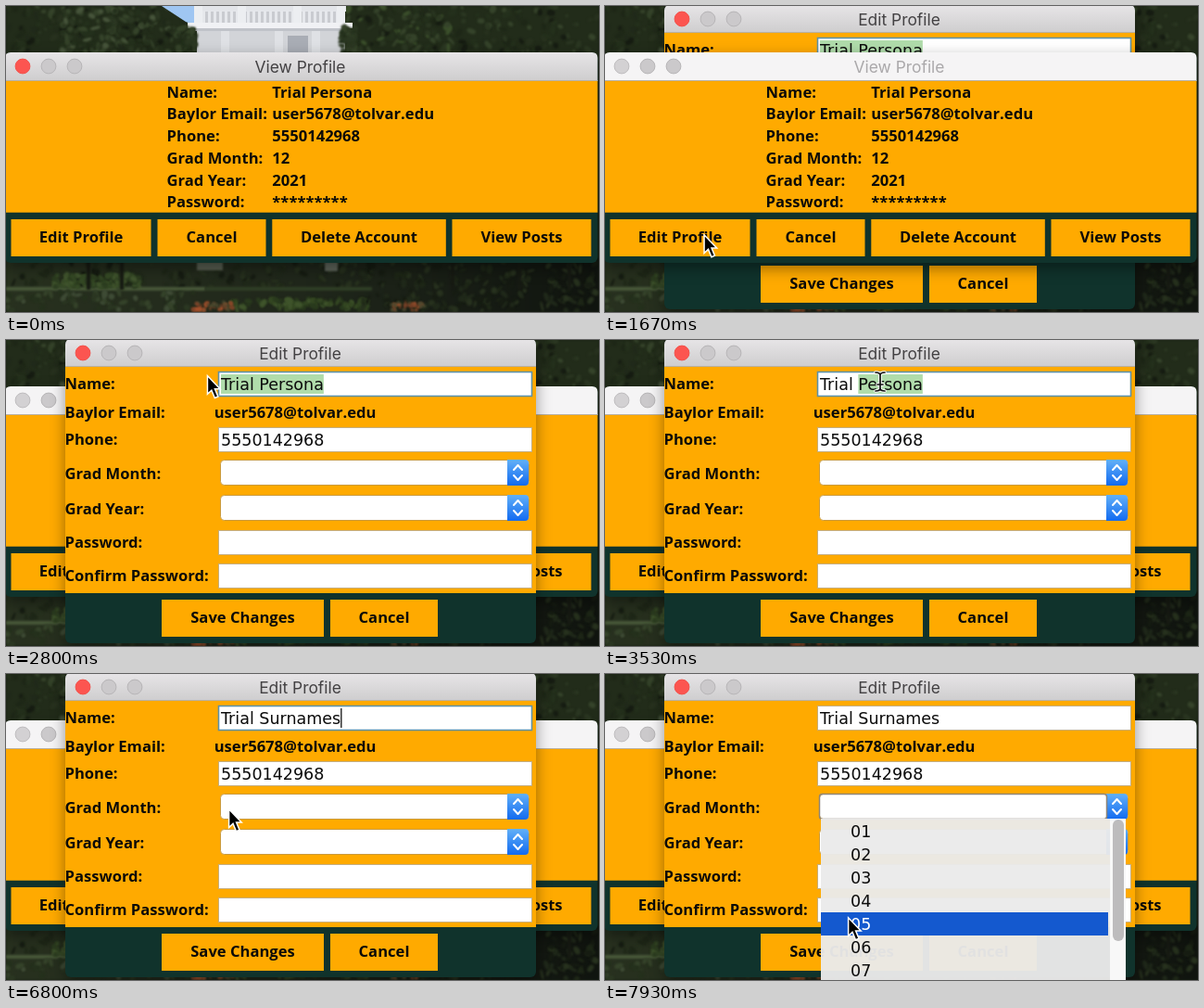
Recreate the animation shown at these times as an HTML page with a canvas. Size 640 px wide and 330 px high, loop 8000 ms.

```html
<!DOCTYPE html>
<html lang="en">
<head>
<meta charset="utf-8">
<title>Edit Profile</title>
<style>
  html, body { margin: 0; width: 100%; height: 100%; overflow: hidden; background: #172012; }
  canvas, svg { position: absolute; left: 0; top: 0; width: 640px; height: 330px; }
  text { white-space: pre; }
  .label { font: bold 16.6px "Open Sans", sans-serif; fill: #0b0b08; }
  .title { font: 17.4px Inter, sans-serif; fill: #434143; }
  .input { font: 17.5px "DejaVu Sans", sans-serif; fill: #0c0c0c; }
  .mid { text-anchor: middle; }
  .window { filter: drop-shadow(0 6px 8px rgba(0, 0, 0, .4)); }
</style>
</head>
<body>
<canvas id="photo" width="640" height="330"></canvas>
<svg id="stage" viewBox="0 0 640 330">
  <defs>
    <linearGradient id="bar" x2="0" y2="1"><stop stop-color="#e7e5e7"/><stop offset="1" stop-color="#cecdce"/></linearGradient>
    <linearGradient id="blue" x2="0" y2="1"><stop stop-color="#62b0f8"/><stop offset="1" stop-color="#126af0"/></linearGradient>
  </defs>
</svg>
<script>
const LOOP = 8000, STEP = LOOP / 120;
const ORANGE = '#ffaa00', GREEN = '#10332c';
const OPEN_EDIT = 1530, RAISE_EDIT = 2650, SELECT_WORD = 3260;
const TYPE_START = 3900, TYPE_GAP = 150, OPEN_LIST = 6910;
const FIRST = 'Trial ', OLD_LAST = 'Persona', NEW_LAST = 'Surnames';
const EMAIL = 'user5678@tolvar.edu', PHONE = '5550142968';
// time, x, y of the pointer
const PATH = [
  [200, 20, 345], [900, 104, 251], [1600, 104, 251], [2330, 208, 37], [2720, 208, 37],
  [3130, 297, 45], [5700, 297, 45], [6600, 240, 145], [7000, 240, 145], [7800, 262, 262]
];

const stage = document.getElementById('stage');

function add(parent, tag, attrs = {}, content) {
  const node = document.createElementNS('http://www.w3.org/2000/svg', tag);
  for (const key in attrs) node.setAttribute(key, attrs[key]);
  if (content !== undefined) node.textContent = content;
  return parent.appendChild(node);
}
const rect = (parent, x, y, width, height, fill, more = {}) =>
  add(parent, 'rect', { x, y, width, height, fill, ...more });
const text = (parent, x, y, content, cls = 'label') =>
  add(parent, 'text', { x, y, class: cls }, content);
const show = (node, on) => node.setAttribute('visibility', on ? 'visible' : 'hidden');

function paintPhoto() {
  const c = document.getElementById('photo').getContext('2d');
  let seed = 7;
  const rnd = () => (seed = (seed * 16807) % 2147483647) / 2147483647;
  const box = (color, x, y, w, h) => { c.fillStyle = color; c.fillRect(x, y, w, h); };
  const leaves = (n, x, y, w, h, colors, size) => {
    for (let i = 0; i < n; i++) {
      c.fillStyle = colors[Math.floor(rnd() * colors.length)];
      c.beginPath();
      c.ellipse(x + rnd() * w, y + rnd() * h, size * (.4 + rnd()), size * (.3 + rnd() * .6), rnd() * 3, 0, 7);
      c.fill();
    }
  };
  const dark = ['#161c12', '#1e2717', '#27311e', '#20291a'];
  const mid = ['#2b3722', '#35432a', '#24301c'];
  const flowers = ['#a5512c', '#7d4328', '#4c4a30'];

  c.filter = 'blur(1.2px)';
  box('#222c1a', 0, 0, 640, 60);
  leaves(420, 0, 0, 640, 55, [...dark, ...mid], 4);
  leaves(110, 60, 0, 120, 52, [...mid, '#46543a'], 4);
  leaves(60, 368, 0, 110, 50, [...mid, '#3b4f2b'], 4);

  c.filter = 'blur(.5px)';
  c.fillStyle = '#9fc6f2';
  c.beginPath();
  c.moveTo(168, 0); c.lineTo(212, 0); c.lineTo(212, 24); c.lineTo(194, 17);
  c.fill();
  box('#c9cbd0', 206, 0, 160, 55);
  box('#e3e5e9', 203, 0, 164, 6);
  for (let x = 206; x < 366; x += 6) box('#e6e8ec', x, 5, 3, 13);
  for (const x of [203, 250, 310, 357]) box('#eceef1', x, 0, 9, 20);
  box('#f0f1f4', 196, 18, 178, 6);
  box('#c0c3c9', 204, 24, 162, 3);
  box('#d2d4d8', 206, 27, 160, 25);
  box('#a9adb5', 304, 32, 22, 20);
  for (const x of [232, 290, 330]) box('#dfe1e5', x, 27, 9, 25);
  c.filter = 'blur(1.2px)';
  leaves(50, 184, 22, 20, 30, mid, 4);
  leaves(50, 362, 22, 14, 28, mid, 4);

  const ground = c.createLinearGradient(0, 0, 640, 0);
  ground.addColorStop(0, '#28311f');
  ground.addColorStop(.5, '#20271b');
  ground.addColorStop(1, '#10140f');
  c.fillStyle = ground;
  c.fillRect(0, 272, 640, 58);
  leaves(220, 0, 274, 640, 30, dark, 4);
  box('#596052', 206, 276, 28, 9);
  box('#5f665c', 344, 276, 14, 10);
  box('#465638', 0, 303, 215, 4);
  box('#2f3d25', 215, 303, 180, 4);
  leaves(110, 52, 290, 92, 13, ['#364a26', '#2c3d20', '#42562f'], 4);
  leaves(70, 0, 308, 205, 20, [...mid, '#3e4b35'], 4);
  leaves(90, 240, 317, 150, 9, ['#344722', '#3f542b', '#293a1d'], 4);
  leaves(90, 385, 305, 255, 24, dark, 4);
  for (const x of [87, 123, 480, 552, 606]) box('#171a13', x, 272, 4, 34);
  leaves(45, 203, 320, 42, 8, flowers, 2.5);
  leaves(35, 415, 320, 38, 8, flowers, 2.5);
  c.filter = 'none';
}

function windowFrame(x, y, w, h, barHeight, footTop, name, titleX) {
  const group = add(stage, 'g', { class: 'window' });
  rect(group, x, y, w, h, GREEN, { rx: 6 });
  const bar = add(group, 'path', {
    d: `M${x} ${y + barHeight}V${y + 6}q0-6 6-6H${x + w - 6}q6 0 6 6V${y + barHeight}z`, fill: 'url(#bar)'
  });
  rect(group, x, y + barHeight - 1, w, 1, '#b9b0a0');
  rect(group, x, y + barHeight, w, footTop - y - barHeight, ORANGE);
  const left = x < 0 ? 18 : x + 19, cy = y + 15;
  const lights = [0, 28, 56].map(dx => add(group, 'circle', {
    cx: left + dx, cy, r: 7.9, fill: dx ? '#cbc9cb' : '#fc5550', stroke: dx ? '#b7b5b7' : '#f3504a'
  }));
  const title = text(group, titleX, y + 21.7, name, 'title mid');
  return { group, bar, lights, title };
}

function button(parent, x, y, w, name) {
  rect(parent, x, y, w, 40, ORANGE);
  text(parent, x + w / 2, y + 24.6, name, 'label mid');
}

function inputBox(parent, y) {
  rect(parent, 229.5, y + .5, 338, 26, '#fff', { stroke: '#c5ae80' });
}

function combo(parent, y) {
  rect(parent, 231.5, y + .5, 333, 27, '#fff', { rx: 4, stroke: '#c99a3d' });
  add(parent, 'path', { d: `M541 ${y}h19q4 0 4 4v20q0 4-4 4h-19z`, fill: 'url(#blue)' });
  add(parent, 'path', {
    d: `M548 ${y + 11}l4.5-5 4.5 5M548 ${y + 17}l4.5 5 4.5-5`,
    fill: 'none', stroke: '#fff', 'stroke-width': 2, 'stroke-linecap': 'round', 'stroke-linejoin': 'round'
  });
}

paintPhoto();

const edit = windowFrame(64, -1, 508, 328, 30, 273, 'Edit Profile', 317.5);
const form = edit.group;
[['Name:', 53], ['Baylor Email:', 83.5], ['Phone:', 112.7], ['Grad Month:', 150], ['Grad Year:', 187.7],
  ['Password:', 224], ['Confirm Password:', 260]].forEach(([name, y]) => text(form, 63.5, y, name));
text(form, 224.7, 83.5, EMAIL);
[34, 94, 205, 241].forEach(y => inputBox(form, y));
[129, 167].forEach(y => combo(form, y));
const focusRing = rect(form, 229.5, 34.5, 338, 26, 'none', { stroke: '#5c91a8', 'stroke-width': 1.6 });
const selection = rect(form, 231, 37, 117, 21, '#b0dcab');
const nameText = text(form, 232, 54, FIRST + OLD_LAST, 'input');
const caret = rect(form, 0, 37, 1.3, 21, '#111');
text(form, 232, 114, PHONE, 'input');
button(form, 168, 280, 175, 'Save Changes');
button(form, 350, 280, 116, 'Cancel');

const view = windowFrame(-1, 50, 639.5, 227, 31, 222.7, 'View Profile', 317.5);
[['Name:', FIRST + OLD_LAST], ['Baylor Email:', EMAIL], ['Phone:', PHONE], ['Grad Month:', '12'],
  ['Grad Year:', '2021'], ['Password:', '*********']].forEach(([name, value], i) => {
  text(view.group, 173.6, 98.7 + i * 23.7, name);
  text(view.group, 287.3, 98.7 + i * 23.7, value);
});
[[5.5, 151, 'Edit Profile'], [163.5, 117, 'Cancel'], [287.3, 187.5, 'Delete Account'], [481.5, 150, 'View Posts']]
  .forEach(([x, w, name]) => button(view.group, x, 230, w, name));

const list = add(stage, 'g');
rect(list, 231.5, 129.5, 310, 27, 'none', { rx: 3, stroke: '#8e8577', 'stroke-width': 1.5 });
rect(list, 233, 156, 329, 180, '#ebebeb', { opacity: .96 });
rect(list, 545, 156, 17, 180, '#f8f8f8');
rect(list, 548, 157, 12, 131, '#bdbcbd', { rx: 6 });
const highlight = rect(list, 233, 0, 310, 25, '#1459cf');
const months = [1, 2, 3, 4, 5, 6, 7].map((n, i) => text(list, 265, 175.5 + i * 25, '0' + n, 'input'));

const pointer = add(stage, 'g');
const arrow = add(pointer, 'path', {
  d: 'M.6 .8V20.5L5 16.4 8.5 24.7 12 23.2 8.6 15H14.2Z', fill: '#000', stroke: '#fff', 'stroke-width': 1.5
});
const beam = add(pointer, 'g', { fill: 'none', 'stroke-linecap': 'round' });
for (const [stroke, width] of [['#fff', 3.6], ['#111', 1.7]])
  add(beam, 'path', { d: 'M-5-10q5 0 5 3 0-3 5-3M-5 10q5 0 5-3 0 3 5 3M0-7V7M-3 3H3', stroke, 'stroke-width': width });

function pointerAt(t) {
  const next = PATH.findIndex(p => p[0] > t);
  if (next < 1) return PATH[next ? PATH.length - 1 : 0].slice(1);
  const [t0, x0, y0] = PATH[next - 1], [t1, x1, y1] = PATH[next];
  const u = (t - t0) / (t1 - t0), k = u * u * (3 - 2 * u);
  return [x0 + (x1 - x0) * k, y0 + (y1 - y0) * k];
}

function render(t) {
  const [x, y] = pointerAt(t);
  const opened = t >= OPEN_EDIT, raised = t >= RAISE_EDIT, listed = t >= OPEN_LIST;

  edit.group.style.display = opened ? '' : 'none';
  const [back, front] = raised ? [view, edit] : [edit, view];
  if (back.group.nextSibling !== front.group) stage.insertBefore(back.group, front.group);
  view.bar.setAttribute('fill', opened ? '#f5f4f5' : 'url(#bar)');
  view.title.style.fill = opened ? '#aaa8aa' : '';
  view.lights[0].setAttribute('fill', opened ? '#d3d1d3' : '#fc5550');
  view.lights[0].setAttribute('stroke', opened ? '#bebcbe' : '#f3504a');

  const typed = t < TYPE_START ? 0 : Math.floor((t - TYPE_START) / TYPE_GAP) + 1;
  nameText.textContent = FIRST + (typed ? NEW_LAST.slice(0, typed) : OLD_LAST);
  selection.style.display = opened && !typed ? '' : 'none';
  if (opened) {
    const length = nameText.getComputedTextLength();
    const start = t >= SELECT_WORD ? nameText.getSubStringLength(0, FIRST.length) : 0;
    selection.setAttribute('x', 232 + start);
    selection.setAttribute('width', length - start);
    caret.setAttribute('x', 232 + length);
  }
  const typing = typed > 0 && typed <= NEW_LAST.length;
  const blink = typing || (t + 600) % 1000 < 500;
  caret.style.display = typed && !listed && blink ? '' : 'none';
  focusRing.style.display = listed ? 'none' : '';

  list.style.display = listed ? '' : 'none';
  const row = Math.floor((y - 157) / 25);
  highlight.style.display = row >= 0 ? '' : 'none';
  highlight.setAttribute('y', 157 + row * 25);
  months.forEach((m, i) => { m.style.fill = i === row ? '#fff' : ''; });

  pointer.style.display = t >= PATH[0][0] ? '' : 'none';
  pointer.setAttribute('transform', `translate(${x} ${y})`);
  const overField = raised && !listed && x > 229 && y > 34 && y < 61;
  show(arrow, !overField);
  show(beam, overField);
}

const begin = performance.now();
function tick() {
  const t = (performance.now() - begin) % LOOP;
  render(Math.floor((t + 4) / STEP) % 120 * STEP);
  requestAnimationFrame(tick);
}
tick();
</script>
</body>
</html>
```
